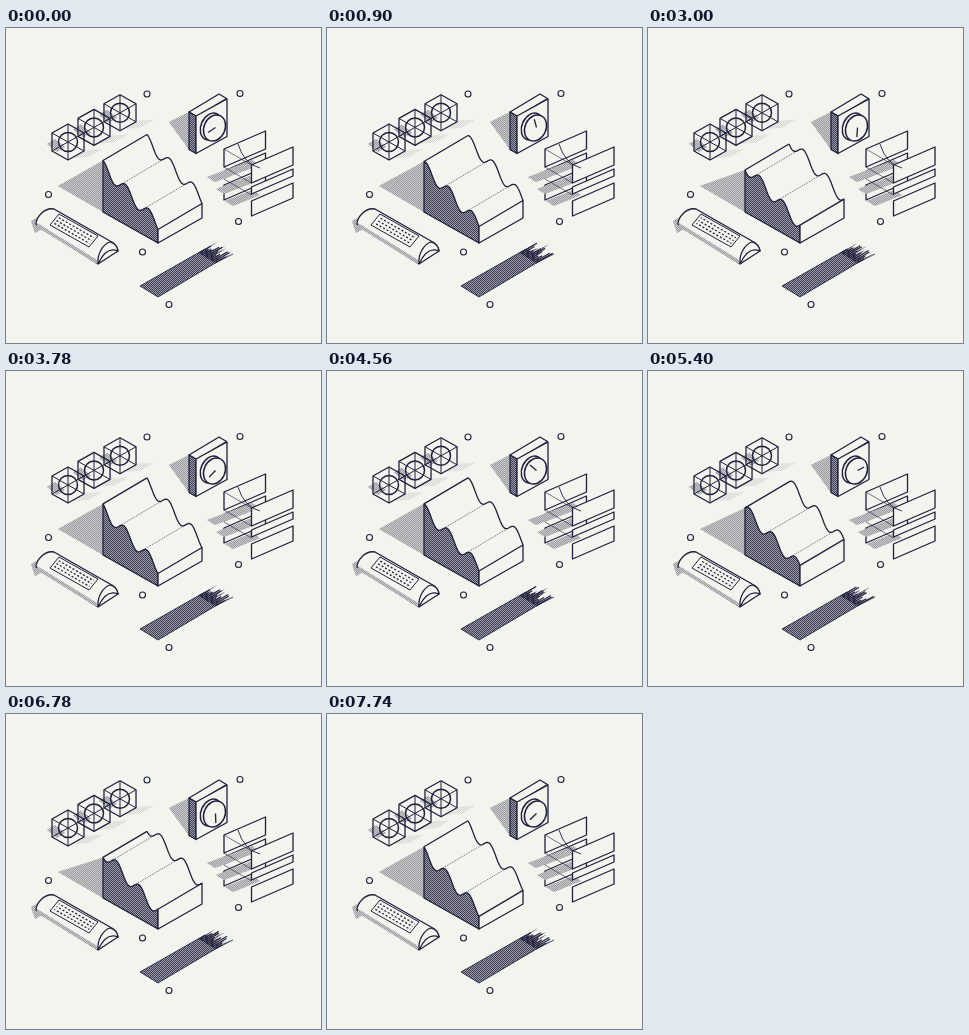
Recreate the animation shown at these times as an HTML page with a canvas. Size 315x315 px, loop 7860 ms.

```html
<!DOCTYPE html>
<html lang="en">
<head>
<meta charset="utf-8">
<title>Isometric instruments</title>
<style>
html, body { margin: 0; width: 100%; height: 100%; overflow: hidden; background: #f3f4ee; }
canvas { display: block; width: 315px; height: 315px; }
</style>
</head>
<body>
<canvas id="stage" width="315" height="315"></canvas>
<script>
const ctx = document.getElementById('stage').getContext('2d');
const PAPER = '#f3f4ee', INK = '#20203c';
const LOOP = 7860, STEP = 60, CYCLE = LOOP / 2;
const TAU = Math.PI * 2;

const ramp = p => TAU * p ** 1.6;
const sweep = p => TAU * p + Math.sin(Math.PI * p) ** 2;

function trace(pts, closed = true) {
  ctx.beginPath();
  pts.forEach(([x, y], i) => i ? ctx.lineTo(x, y) : ctx.moveTo(x, y));
  if (closed) ctx.closePath();
}

function ink(width = 1.3) {
  ctx.strokeStyle = INK;
  ctx.lineWidth = width;
  ctx.stroke();
}

function paint(fill) {
  ctx.fillStyle = fill;
  ctx.fill();
}

function shape(pts, fill = PAPER, width = 1.3) {
  trace(pts);
  if (fill) paint(fill);
  if (width) ink(width);
}

function line(pts, width = 1.3) {
  trace(pts, false);
  ink(width);
}

// parallelogram from a corner and two edge vectors
function quad(x, y, ax, ay, bx, by) {
  return [[x, y], [x + ax, y + ay], [x + ax + bx, y + ay + by], [x + bx, y + by]];
}

// flat tone broken up by a fine checker
function screen(pts, base, dot) {
  const xs = pts.map(p => p[0]), ys = pts.map(p => p[1]);
  const left = Math.floor(Math.min(...xs)), right = Math.max(...xs);
  const top = Math.floor(Math.min(...ys)), bottom = Math.max(...ys);
  ctx.save();
  trace(pts);
  ctx.clip();
  ctx.fillStyle = base;
  ctx.fillRect(left, top, right - left + 1, bottom - top + 1);
  ctx.fillStyle = dot;
  for (let y = top; y <= bottom; y++)
    for (let x = left + (left + y) % 2; x <= right; x += 2) ctx.fillRect(x, y, 1, 1);
  ctx.restore();
}

const dark = pts => screen(pts, '#3c3c55', '#9d9ea8');
const shade = pts => screen(pts, '#9a9ba3', '#cbccca');
const haze = pts => screen(pts, '#d6d7d5', '#eeefea');

function ring(x, y, rx, ry = rx, turn = 0, fill = null, width = 1.3) {
  ctx.beginPath();
  ctx.ellipse(x, y, rx, ry, turn, 0, TAU);
  if (fill) paint(fill);
  ink(width);
}

function cube(x, y) {
  const hex = [];
  for (let i = 0; i < 6; i++) {
    const a = i * TAU / 6;
    hex.push([x + 18.5 * Math.sin(a), y - 18 * Math.cos(a)]);
  }
  shade(quad(x - 21, y + 2, 8, -5, 10, 8));
  haze(quad(x + 4, y + 16, 14, -8, 16, -1));
  shape(hex, null);
  hex.forEach(p => line([[x, y], p], 1));
  ring(x, y, 9.5, 9.5, 0, null, 1.5);
}

function dial(turn) {
  shade([[163, 94], [183, 84], [184, 123]]);
  const side = quad(183, 84, 7, 4, 0, 37.5);
  shape(quad(183, 84, 30, -18, 7.5, 4.5));
  dark(side);
  shape(side, null);
  shape(quad(190, 88, 31, -17, 0, 37.5));
  ring(205, 98.5, 10, 14, .42, PAPER, 1.5);
  ring(208.5, 100, 10.5, 13.5, .42, PAPER, 1.5);
  const a = TAU * 2 / 3 + turn;
  line([[209.5, 99.5], [209 + 8 * Math.sin(a), 100 - 9 * Math.cos(a)]]);
}

function waveBlock(phase) {
  const top = [];
  const height = u => 138.5 + 1.06 * u - 6 * Math.cos(u / 23 * TAU - phase);
  for (let u = 0; u <= 55; u++) top.push([97 + u, height(u)]);
  const shift = ([x, y]) => [x + 44, y - 26];
  const back = top.map(shift), first = top[0], last = top[55];

  shade([[52, 158], first, [97, 184]]);
  shape([...top, ...back.slice().reverse()], PAPER, 0);
  // fold lines where the surface is nearly edge-on
  ctx.setLineDash([1, 1]);
  for (let u = (phase / TAU - 1.25) * 23; u < 52; u += 23) {
    const p = [97 + u, height(u)];
    if (u > 3) line([p, shift(p)], .7);
  }
  ctx.setLineDash([]);
  const face = [...top, [152, 215], [97, 184]];
  dark(face);
  shape(face, null);
  shape([last, shift(last), [196, 190], [152, 215]]);
  line(back);
  line([first, shift(first)]);
}

function panels() {
  const heights = [[0, 18], [22, 7], [36, 15]];
  const stack = (x, y, fill) =>
    heights.forEach(([dy, h]) => shape(quad(x, y + dy, 41.5, -18, 0, h), fill));
  stack(218, 121, null);
  for (let i = 0; i < 3; i++) shade(quad(201 + i * 9, 149 + i * 12, 45 - i * 9, -17 + i * 3, 8, 5));
  stack(245.5, 137, PAPER);
  ctx.beginPath();
  ctx.moveTo(232, 116);
  ctx.quadraticCurveTo(238, 136, 254, 140);
  ink(.9);
  [121, 139, 151].forEach(y => line([[218, y], [245.5, y + 16]], .6));
}

function arch(move) {
  shade(quad(25, 193, 9, -5, 4, 12));
  ctx.beginPath();
  ctx.moveTo(30, 196);
  ctx.bezierCurveTo(30, 190, 38, 179, 48, 181);
  ctx.lineTo(104, 213);
  ctx.quadraticCurveTo(111, 216, 112, 223);
  ctx.lineTo(92, 236);
  ctx.closePath();
  paint(PAPER);
  ink();
  shade(quad(31, 195, 60, 37, 0, 4));
  ctx.beginPath();
  ctx.moveTo(92, 236);
  ctx.bezierCurveTo(91, 226, 97, 216, 104, 214);
  ctx.quadraticCurveTo(111, 216, 112, 223);
  ctx.bezierCurveTo(103, 219, 97, 225, 92, 236);
  paint(PAPER);
  ink();
  shape(quad(53, 186, 39, 22, -9, 11), null, 1);
  ctx.setLineDash([2, 2]);
  ctx.lineDashOffset = -move;
  for (let i = 1; i < 4; i++)
    line([[55 - i * 2.2, 187 + i * 2.8], [90 - i * 2.2, 207 + i * 2.8]]);
  ctx.setLineDash([]);
}

function strip(p) {
  const end = [];
  for (let i = 0; i <= 14; i++) {
    const spike = i % 2 ? 0 : 12 + 7 * Math.sin(i * 2.4) + 2.5 * Math.cos(TAU * p + i * .7);
    end.push([199 + i * .86 + spike * .87, 221 + i * .93 - spike * .5]);
  }
  dark([[134, 258], ...end, [152, 269]]);
  // brush marks near the torn end
  for (let i = 0; i < 11; i++) {
    const x = 193 + i * 1.6, y = 225 + i;
    const len = 12 + 5 * Math.sin(i * 5 + TAU * p);
    line([[x, y], [x + len, y - len * .58]], 1.2);
  }
  line([[152, 269], [134, 258], [199, 221]], .8);
  line([[152, 269], [211, 234], [227, 226]], .8);
}

function draw(ms) {
  const t = Math.floor(ms % LOOP / STEP) * STEP;
  const p = t % CYCLE / CYCLE;
  ctx.fillStyle = PAPER;
  ctx.fillRect(0, 0, 315, 315);
  ctx.lineJoin = 'round';
  for (let i = 2; i >= 0; i--) cube(62 + i * 26, 114 - i * 14.6);
  dial(sweep(p));
  panels();
  waveBlock(ramp(p));
  arch(p * 4);
  strip(p);
  [[141, 66], [234, 65.5], [42.5, 166.5], [136.5, 224], [232.5, 193.5], [163, 276.5]]
    .forEach(([x, y]) => ring(x, y, 3, 3, 0, PAPER, 1.1));
}

let start = null;
function tick(now) {
  if (start === null) start = now;
  draw(Math.max(0, now - start));
  requestAnimationFrame(tick);
}
draw(0);
requestAnimationFrame(tick);
</script>
</body>
</html>
```
